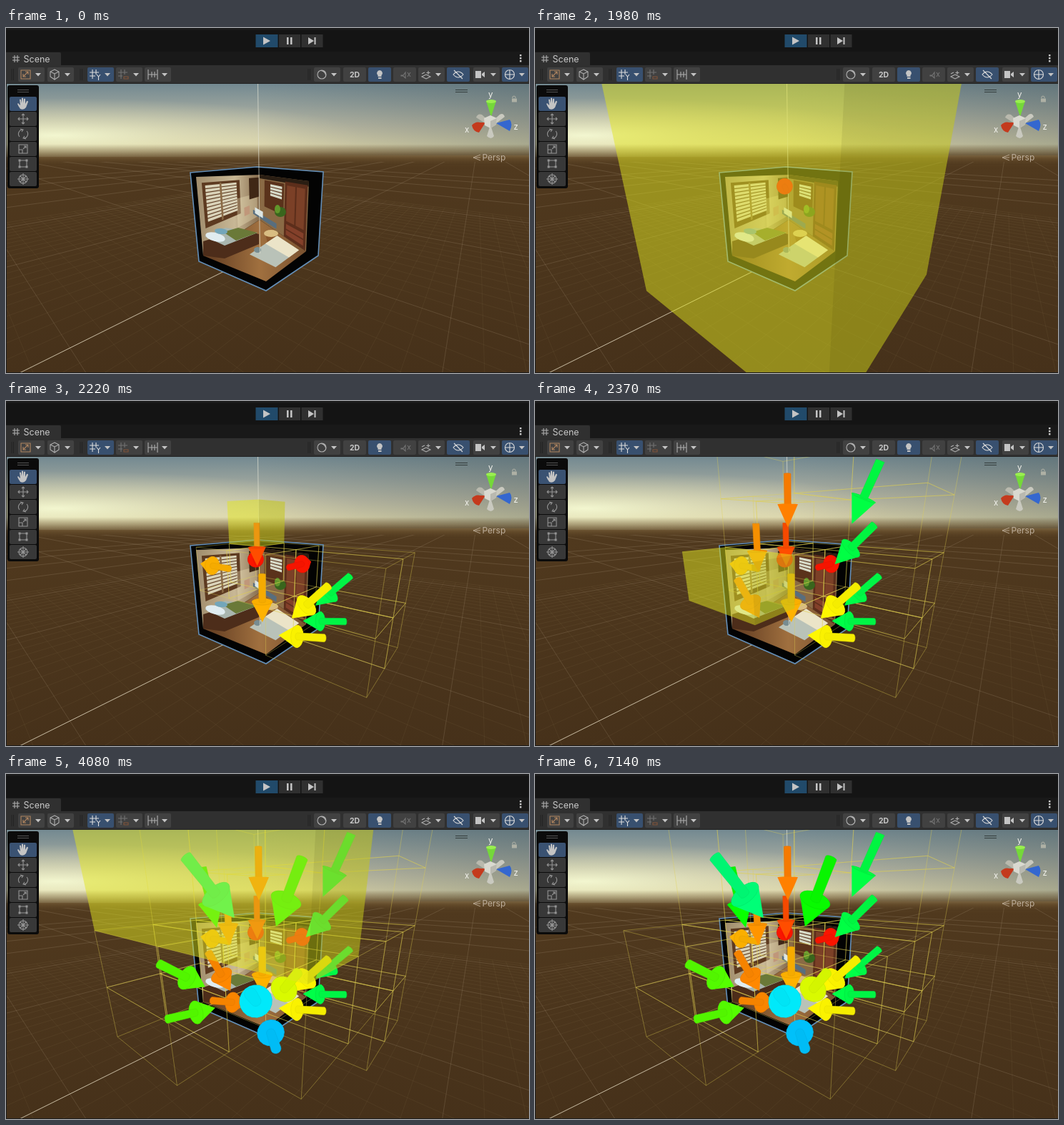
Write an HTML page with a canvas that moves like this. It is 732x482 px and loops after 8 s.

```html
<!DOCTYPE html>
<html lang="en">
<head>
<meta charset="utf-8">
<title>Octree build</title>
<style>
  html, body { margin: 0; width: 100%; height: 100%; overflow: hidden; background: #141414; }
  canvas, svg { position: absolute; left: 0; top: 0; width: 732px; height: 482px; }
  text { font-family: Inter, Roboto, sans-serif; fill: #c8c8c8; }
  .line { fill: none; stroke: #b0b0b0; stroke-width: 1.1; }
  .tool { fill: none; stroke: #949494; stroke-width: 1.1; }
  .icon { fill: #c4c4c4; }
  .dim { opacity: .45; }
  .axis { fill: #f2f2ec; }
</style>
</head>
<body>
<canvas id="scene" width="732" height="482"></canvas>
<svg viewBox="0 0 732 482">
  <rect width="732" height="34" fill="#141414"/>
  <rect width="732" height="3" fill="#1b1b1b"/>
  <rect x="349.500" y="9" width="31" height="18" fill="#214a6a"/>
  <path d="M382 9h30v18h-30zM413.500 9h30v18h-30z" fill="#303030"/>
  <path class="icon" d="M360 12.500l10 5.500-10 5.500zM393 13h2.500v10H393zM398 13h2.500v10H398zM423 13l8 5-8 5zM431.500 13h2v10h-2z"/>
  <rect y="33" width="732" height="19" fill="#191919"/>
  <path d="M0 34h75q2 0 2 2v16H0z" fill="#303030"/>
  <path class="line" d="M12 38v10M16 38v10M9 41h10M9 45h10"/>
  <text x="24.500" y="47.500" font-size="12.500">Scene</text>
  <path class="icon" d="M719 37h2.500v2.500H719zM719 41h2.500v2.500H719zM719 45h2.500v2.500H719z"/>
  <rect y="52" width="732" height="26" fill="#303030"/>
  <path d="M0 77.500h732" stroke="#222"/>
  <g id="bar"></g>
  <g class="line">
    <path d="M21 59h13v12H21zM24 68l7-7M24 64v4h4M31 65v-4h-4" stroke="#b08560"/>
    <path d="M68 58l6 3v7l-6 4-6-4v-7zM62 61l6 3 6-3M68 64v8"/>
    <path d="M121 58v13M126 58v7M117 62h13M117 67h8M127 65l2.500 3 2.500-3M129.500 68v5" stroke="#ddd"/>
    <g class="dim"><path d="M161 58v13M166 58v7M157 62h13M157 67h6"/><path d="M165 68h6v3h-6z" stroke="#d06a30"/></g>
    <path d="M199 58v14M204 61v8M208 61v8M212 58v14M199 65h13"/>
    <circle cx="442" cy="65" r="6"/>
    <path d="M553 66h3l3-4v8l-3-3h-3zM562 62l4 6M562 68l4-6" class="line dim"/>
    <path d="M582 68l6-3 6 3-6 3zM582 64l4-2M591 60v5M588.500 62.500h5"/>
    <path d="M626 65q7-8 14 0-7 8-14 0zM627 59l12 12" stroke="#ddd"/>
    <path d="M698.500 65a6.500 6.500 0 1 1 13 0 6.500 6.500 0 1 1-13 0h13M705 58v14" stroke="#ddd"/>
  </g>
  <path class="icon" d="M439 60a6 6 0 0 1 8 8 7 7 0 0 0-8-8zM657 60h8v10h-8zM666 64l4-3v8l-4-3zM523 59a4 4 0 0 1 2.500 7v2h-5v-2a4 4 0 0 1 2.500-7zM521 69h4.500v2H521z"/>
  <text x="481" y="69" font-size="10.500" font-weight="700">2D</text>

  <rect x="2" y="80" width="44" height="144" rx="3" fill="#0b0b0b"/>
  <path d="M16 86.500h16M16 89.500h16" stroke="#555"/>
  <g id="tools"></g>
  <path class="icon" d="M20 113q-3-4-4-7l1-1 3 3-1-8q1-1 2 0l1 5v-7q1-1 2 0v7l1-6q1-1 2 0v7l2-4q1-1 2 1l-3 8q-3 4-8 2z"/>
  <path class="tool" d="M24 120v14M17 127h14M22 122l2-2 2 2M22 132l2 2 2-2M19 125l-2 2 2 2M29 125l2 2-2 2"/>
  <path class="tool" d="M19 152a6 6 0 0 1 4-10M29 144a6 6 0 0 1-4 10M20 141l4 1-2 3M28 155l-4-1 2-3"/>
  <path class="tool" d="M18 163h12v12H18zM18 170h5v5M24 169l4-4M25 165h3v3M19 185h10v9H19z"/>
  <path class="tool" d="M18 211a6 6 0 1 1 12 0 6 6 0 1 1-12 0M24 203v16M16 211h16M20 207l8 8M28 207l-8 8"/>
  <path fill="#949494" d="M17.500 183.500h3v3h-3zM27.500 183.500h3v3h-3zM17.500 192.500h3v3h-3zM27.500 192.500h3v3h-3z"/>

  <path d="M629 86.500h17M629 89.500h17" stroke="#333c3b"/>
  <path d="M658 125q2-6 8-4l10 9-4 4z" fill="#b9b9ad"/>
  <path d="M698 124q-2-6-7-3l-10 9 4 4zM678 135l5 16q-4 6-10 0z" fill="#c9c9bf"/>
  <path d="M652 136q5-6 12-4l7 0-9 14q-8-1-10-10z" fill="#c43a1d"/>
  <path d="M686 133l19-5q5 6 0 16z" fill="#3467cf"/>
  <path d="M672 102h14l-7 22z" fill="#75d83a"/><ellipse cx="679" cy="102.500" rx="7" ry="2.500" fill="#9aee50"/>
  <path d="M669 126l9-4 9 4-1 9-8 5-8-4z" fill="#d9d9d0"/><path d="M678 130l9-4-1 9-8 5z" fill="#b9b9b0"/>
  <g font-size="11.500"><text class="axis" x="675" y="97">y</text><text class="axis" x="642" y="146">x</text><text class="axis" x="710.500" y="142">z</text></g>
  <path d="M708 98.500h7v5h-7z" fill="#aeb0a5"/><path d="M709 98v-2q2-2 4 0v2" fill="none" stroke="#aeb0a5"/>
  <path d="M664 177l-10 4 10 4M654 181h10" fill="none" stroke="#b4a38d"/>
  <text x="666.500" y="185" font-size="12" style="fill:#bdae9b">Persp</text>
  <path d="M.5 78v404M0 481.500h732" stroke="#1c1c1c"/>
</svg>
<script>
const LOOP = 8000, START = 1980, STEP = 30, END_FILL = 6990;
const W = 732, H = 482, TOP = 78;
let g = document.getElementById('scene').getContext('2d');

// toolbar and tool palette buttons
const button = (x, y, w, c) => `<rect x="${x}" y="${y}" width="${w}" height="20" rx="2" fill="${c}"/>`;
const barButton = (x, w, on, menu) => button(x, 55, w, on ? '#38506f' : '#414141') +
  (menu ? `<path class="icon" d="M${x + w - 13} 63h8l-4 4.500z"/>` : '');
const grip = x => `<path d="M${x} 57v16M${x + 2.5} 57v16" stroke="#222"/>`;
document.getElementById('bar').innerHTML = [8, 104, 423].map(grip).join('') +
  [17, 58, 114, 154, 194, 431, 577, 654, 694].map(x => barButton(x, 37, x === 114 || x === 694, true)).join('') +
  [472, 507, 542, 617].map(x => barButton(x, 32, x === 507 || x === 617)).join('');
document.getElementById('tools').innerHTML =
  [...Array(6).keys()].map(i => button(5, 96 + i * 21, 38, i ? '#383838' : '#3a5272')).join('');

// vectors and camera: front corner of the root cube and its three axes
const add = (p, q, k = 1) => p.map((v, i) => v + q[i] * k);
const dot = (p, q) => p.reduce((s, v, i) => s + v * q[i], 0);
const unit = p => p.map(v => v / Math.hypot(...p));
const cross = ([a, b, c], [x, y, z]) => [b * z - c * y, c * x - a * z, a * y - b * x];
const FRONT = [.069, .4918, .5897];
const AXES = [[-.7795, -.197, .5945], [.6234, -.246, .7422], [0, -.9493, -.3146]];
const turn = p => AXES.reduce((s, ax, i) => add(s, ax, p[i]), [0, 0, 0]);
const view = p => add(FRONT, turn(p));
const flat = ([x, y, z]) => [366 + 350 * x / z, 280 + 350 * y / z];
const project = p => flat(view(p));

function poly(pts, fill, stroke, lw = 1) {
  g.beginPath();
  pts.forEach(p => g.lineTo(...p));
  g.closePath();
  if (fill) { g.fillStyle = fill; g.fill(); }
  if (stroke) { g.strokeStyle = stroke; g.lineWidth = lw; g.stroke(); }
}
function oval(x, y, rx, ry, c, rot = 0) {
  g.fillStyle = c;
  g.beginPath(); g.ellipse(x, y, rx, ry, rot, 0, 7); g.fill();
}
function seg(p, q, c, lw = 1) {
  g.strokeStyle = c; g.lineWidth = lw;
  g.beginPath(); g.moveTo(...p); g.lineTo(...q); g.stroke();
}
function band(x0, y0, x1, y1, stops) {
  const gr = g.createLinearGradient(x0, y0, x1, y1);
  stops.forEach(([k, c]) => gr.addColorStop(k, c));
  return gr;
}
function hull(pts) {
  pts = [...pts].sort((p, q) => p[0] - q[0] || p[1] - q[1]);
  const half = list => {
    const out = [];
    for (const p of list) {
      while (out.length > 1) {
        const [u, v] = out.slice(-2);
        if ((v[0] - u[0]) * (p[1] - u[1]) > (v[1] - u[1]) * (p[0] - u[0])) break;
        out.pop();
      }
      out.push(p);
    }
    return out.slice(0, -1);
  };
  return half(pts).concat(half(pts.reverse()));
}

function groundLine(p, q, c) {
  p = view(p); q = view(q);
  if (p[2] < .1 && q[2] < .1) return;
  const cut = (u, v) => u[2] >= .1 ? u : add(u, add(v, u, -1), (.1 - u[2]) / (v[2] - u[2]));
  seg(flat(cut(p, q)), flat(cut(q, p)), c);
}

function world() {
  g.fillStyle = band(0, TOP, 0, H, [
    [0, '#738991'], [.08, '#98a29c'], [.15, '#bbbaa4'], [.21, '#d8d2aa'], [.235, '#bbac80'],
    [.258, '#83693f'], [.285, '#50391e'], [1, '#46311a']]);
  g.fillRect(0, TOP, W, H);
  const glow = g.createRadialGradient(0, 0, 0, 0, 0, 1);
  glow.addColorStop(0, 'rgba(250,255,215,.85)');
  glow.addColorStop(.4, 'rgba(240,240,195,.5)');
  glow.addColorStop(1, 'rgba(230,225,180,0)');
  g.save();
  g.beginPath(); g.rect(0, TOP, W, 102); g.clip();
  g.translate(70, 150); g.scale(430, 52);
  g.fillStyle = glow; g.fillRect(-2, -2, 6, 4);
  g.restore();
  g.fillStyle = band(350, 0, W, 0, [[0, 'rgba(60,75,78,0)'], [1, 'rgba(60,75,78,.3)']]);
  g.fillRect(350, TOP, W, 100);
  g.fillStyle = band(0, 162, 0, 192, [[0, 'rgba(80,57,30,0)'], [1, 'rgba(80,57,30,.9)']]);
  g.fillRect(0, 162, W, 30);

  g.save();
  g.beginPath(); g.rect(0, 187, W, H); g.clip();
  for (let i = -60; i <= 60; i++) {
    const major = i % 10 === 0, r = major ? 14 : 2.2, k = .75 + i * .1;
    if (!major && Math.abs(i) > 22) continue;
    const c = major ? 'rgba(165,145,115,.25)' : 'rgba(160,135,100,.1)';
    groundLine([k, .75 - r, 0], [k, .75 + r, 0], c);
    groundLine([.75 - r, k, 0], [.75 + r, k, 0], c);
  }
  g.restore();
  groundLine([.75, -1, 0], [.75, .75, 0], 'rgba(220,210,185,.8)');
}

// room faces as quads, with patches placed in 0..1 face coordinates
const A = [266, 208], B = [355, 205], C = [424, 214], D = [420, 312], E = [364, 354], G = [276, 318], O = [355, 268];
const LEFT = [A, B, O, G], RIGHT = [B, C, D, O], FLOOR = [G, O, D, E];
const at = ([p, q, r, s], u, v) => [0, 1].map(i =>
  (p[i] * (1 - u) + q[i] * u) * (1 - v) + (s[i] * (1 - u) + r[i] * u) * v);
const patch = (face, u, v, w, h, c) =>
  poly([at(face, u, v), at(face, u + w, v), at(face, u + w, v + h), at(face, u, v + h)], c);

function room() {
  poly([[258, 202], [351, 194], [444, 201], [437, 318], [364, 367], [270, 326]], '#030303', '#648fb8', 1.6);
  patch(LEFT, 0, 0, 1, 1, band(266, 0, 356, 0, [[0, '#a08c6c'], [.6, '#c8b896'], [1, '#84694a']]));
  patch(RIGHT, 0, 0, 1, 1, '#8a6a45');
  patch(FLOOR, 0, 0, 1, 1, band(290, 0, 420, 0, [[0, '#6a4325'], [.5, '#a0703f'], [1, '#7a5230']]));
  patch(RIGHT, 0, 0, 1, .08, '#2a1e13');
  // window and blinds
  patch(LEFT, .08, .08, .6, .6, '#5d3a20');
  for (let i = 0; i < 10; i++) patch(LEFT, .13, .12 + i * .05, .5, .038, '#d9d2b8');
  patch(LEFT, .36, .1, .03, .56, '#8a6a45');
  patch(LEFT, .62, .4, .34, .5, 'rgba(240,228,190,.35)');
  patch(LEFT, .83, .06, .16, .42, '#3f2716');
  patch(LEFT, .74, .6, .09, .16, '#c0977a');
  // door, desk, wardrobe
  patch(RIGHT, .1, .1, .4, .55, '#5a321b');
  for (let i = 0; i < 4; i++) patch(RIGHT, .22, .16 + i * .06, .24, .045, '#d7dac8');
  patch(RIGHT, -.14, .86, .5, .1, '#586e7e');
  patch(RIGHT, -.1, .78, .17, .14, '#dce6e4');
  patch(RIGHT, .52, .06, .46, .94, '#5c2e1b');
  for (let i = 0; i < 2; i++) {
    patch(RIGHT, .56 + i * .2, .12, .17, .6, '#7b4027');
    patch(RIGHT, .56, .77 + i * .1, .37, .08, '#83402a');
  }
  oval(384, 257, 8, 7, '#39651d'); oval(380, 253, 4, 6, '#61962b');
  // bed
  poly([G, [276, 298], [330, 281], [354, 288], [354, 302], [306, 322]], '#4d2d1a');
  poly([[278, 291], [307, 279], [352, 286], [306, 304]], '#a9b5ae');
  poly([[304, 285], [325, 279], [352, 286], [322, 297]], '#6a7938');
  oval(293, 292, 14, 6, '#e0ecf0', .25);
  oval(301, 284, 9, 4, '#73a6ba', .1);
  // stool and rug
  poly([[363, 288], [380, 288], [377, 300], [366, 300]], '#8a562b');
  oval(371, 287, 10, 5, '#d9bd82');
  patch(FLOOR, .38, .44, .56, .46, '#b9c2b8');
  patch(FLOOR, .7, .44, .24, .46, '#ebe4c8');
  oval(352, 310, 5, 4, '#778c91');
  seg(project([.75, .75, 0]), [352.5, TOP], 'rgba(225,225,210,.7)');
}

const back = document.createElement('canvas');
back.width = W; back.height = H;
const stage = g;
g = back.getContext('2d');
world();
room();
g = stage;

// a block between two corners (a, b, height in quarters), cut into leaf cells; hue runs along b
function block(from, to, cuts, hue, hueEnd = hue) {
  const lo = [...from].map(v => v / 4), n = [...cuts].map(Number);
  const size = [...to].map((v, i) => (v / 4 - lo[i]) / n[i]);
  const out = [];
  for (let i = n[0]; i--;) for (let j = n[1]; j--;) for (let k = n[2]; k--;)
    out.push({ lo: add(lo, [i * size[0], j * size[1], k * size[2]]), size, hue: hue + (hueEnd - hue) * j / (n[1] - 1 || 1) });
  return out;
}
const root = block('000', '444', '111')[0];
const cells = [
  block('221', '442', '221', 42, 5),
  block('020', '242', '122', 58, 137),
  block('322', '443', '121', 35, 18),
  block('223', '444', '111', 30),
  block('022', '244', '112', 136),
  block('200', '422', '122', 100, 32),
  block('001', '222', '121', 184, 68),
  block('000', '221', '111', 194),
  block('012', '424', '211', 118),
  block('002', '414', '111', 148)
].flat();

for (const c of [root, ...cells]) {
  c.pts = [...Array(8).keys()].map(i => project(c.lo.map((v, k) => v + (i >> k & 1) * c.size[k])));
  c.mid = add(c.lo, c.size, .5);
  c.framed = c.pts.every(p => p[1] > -100 && p[1] < 500);
}

function fillCell({ pts }) {
  poly(hull(pts), 'rgba(226,230,32,.5)');
  poly([pts[0], pts[2], pts[6], pts[4]], 'rgba(50,45,0,.09)');
}
function wireCell({ pts, framed }) {
  if (!framed) return;
  for (let i = 0; i < 8; i++)
    for (const bit of [1, 2, 4])
      if (!(i & bit)) seg(pts[i], pts[i | bit], 'rgba(222,208,80,.42)', .9);
}

// from a cell centre toward the closest part of the room: its top, a back wall or the floor
function aim([a, b, h]) {
  const high = h > .5, edge = high ? .45 : .55;
  const wall = v => v > .8 ? 1.05 : v;
  if (!high && Math.min(a, b) > edge && Math.max(a, b) > .8) return [wall(a), wall(b), h];
  return [Math.max(a, edge), Math.max(b, edge), high ? .42 : .05];
}

function arrow({ mid, hue }) {
  const tail = view(mid), dir = unit(turn(add(aim(mid), mid, -1)));
  const neck = add(tail, dir, .15), tip = flat(add(tail, dir, .27));
  const e = unit(cross(dir, [.1, 0, 1])), f = cross(dir, e);
  const ring = (p, r) => [...Array(20).keys()].map(i => {
    const t = i * Math.PI / 10;
    return flat(add(add(p, e, r * Math.cos(t)), f, r * Math.sin(t)));
  });
  const tone = l => `hsl(${hue},100%,${l}%)`;
  const base = ring(neck, .056);
  const cone = () => poly(hull([...base, tip]), tone(50));
  const shaft = () => poly(hull([...ring(tail, .018), ...ring(neck, .018)]), tone(48), tone(45), .6);
  if (dot(dir, neck) > 0) { cone(); poly(base, tone(49), tone(45), .7); shaft(); }
  else { shaft(); cone(); }
}

function draw() {
  const t = performance.now() % LOOP;
  g.clearRect(0, 0, W, H);
  g.save();
  g.beginPath(); g.rect(0, TOP, W, H - TOP); g.clip();
  g.drawImage(back, 0, 0);
  if (t >= START) {
    const step = Math.min(cells.length - 1, Math.floor((t - START) / STEP));
    cells.slice(0, step).forEach(wireCell);
    cells.slice(0, step + 1).sort((p, q) => view(q.mid)[2] - view(p.mid)[2]).forEach(arrow);
    if (t < END_FILL) fillCell(step ? cells[step] : root);
  }
  g.restore();
  requestAnimationFrame(draw);
}
draw();
</script>
</body>
</html>
```
